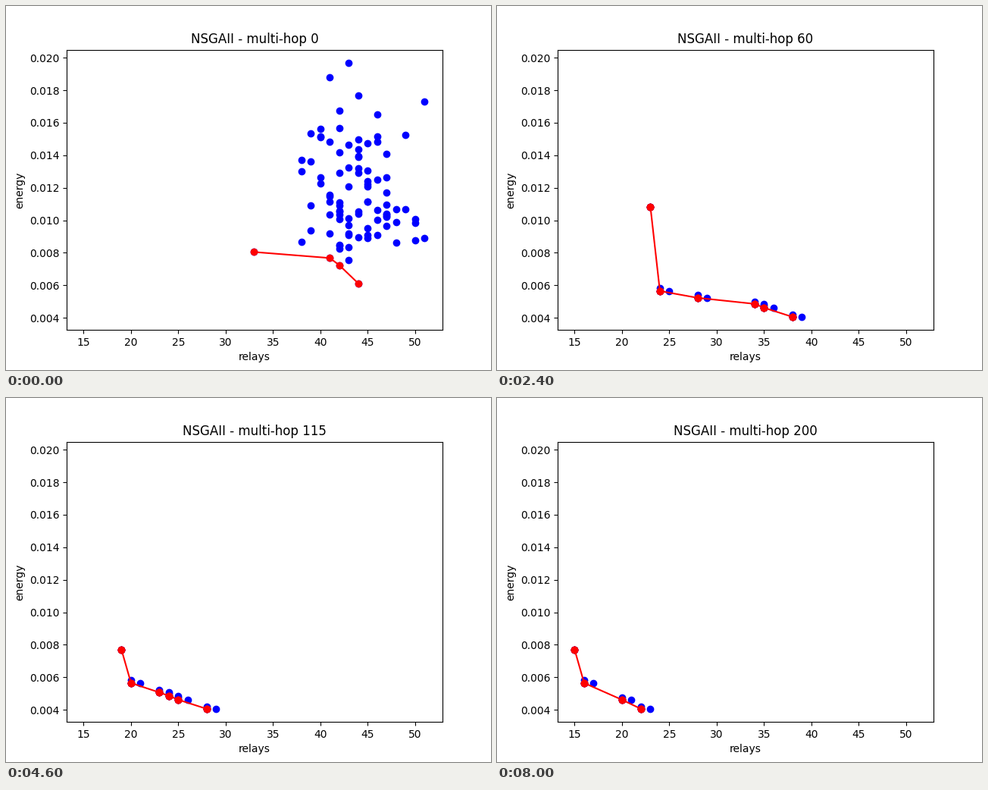
A matplotlib script for the animation above (8200 ms loop, 640 by 480 pixels).

```python
import numpy as np
import matplotlib.pyplot as plt
from matplotlib.animation import FuncAnimation

STEP, LAST = 5, 200    # generations per picture, final generation
UNIT = 1e-5            # energies below are given in this unit
SETTLE = 20            # generations until the first cloud reaches the front
CLOUD_SIZE = 88

# How few relays each energy level needs: level -> generations, relays
TRACKS = {
    1622: ([5, 20], [31, 28]),
    1083: ([25, 40, 60], [28, 25, 23]),
    805: ([0, 20], [33, 29]),
    768: ([0, 20], [41, 33]),
    724: ([0, 20], [42, 33]),
    682: ([5, 20], [38, 30]),
    668: ([10, 20], [38, 32]),
    612: ([0, 20], [44, 34]),
    602: ([10, 20, 40], [40, 33, 26]),
    565: ([60, 75, 115, 150, 200], [24, 22, 20, 17, 16]),
    523: ([5, 20, 40, 75], [40, 34, 31, 26]),
    507: ([20, 40, 115], [43, 39, 23]),
    486: ([30, 40, 115, 150], [40, 38, 24, 21]),
    462: ([35, 40, 75, 115, 150, 200], [41, 40, 32, 25, 22, 20]),
    406: ([60, 75, 115, 150, 200], [38, 33, 28, 24, 22]),
    769: ([90, 115, 150, 200], [20, 19, 17, 15]),
}

rng = np.random.default_rng(4)
relays0 = np.clip(np.round(rng.normal(44, 3, CLOUD_SIZE)), 38, 51)
energy0 = np.where(relays0 < 42, 810, 750) + rng.gamma(2, 190, CLOUD_SIZE)
energy0 = np.minimum(energy0, 1969)


def stragglers(gen):
    """The random start, sinking to a sloped band and then dying out."""
    k = min(gen / SETTLE, 1) ** 0.6
    home = 31 + (relays0 - 38) * 8 / 13
    relays = np.round(relays0 + (home - relays0) * k)
    energy = energy0 + (690 - 17 * (relays - 31) - energy0) * k
    alive = int(CLOUD_SIZE * np.clip(2 - gen / SETTLE, 0, 1) ** 3)
    return list(zip(relays, energy))[:alive]


def pareto(pop):
    def dominated(p):
        return any(q != p and q[0] <= p[0] and q[1] <= p[1] for q in pop)
    return sorted(p for p in pop if not dominated(p))


def evolve(gen):
    best = pareto([(round(np.interp(gen, gens, relays)), level)
                   for level, (gens, relays) in TRACKS.items()
                   if gen >= gens[0]])
    pop = best + stragglers(gen)
    if gen:
        # near copies: one relay more, or slightly more energy
        for relays, energy in best[1:]:
            pop += [(relays + 1, energy), (relays, energy * 1.03)]
        pop += best * 2
    return pop, pareto(pop)


def place(line, pts):
    line.set_data([r for r, _ in pts], [e * UNIT for _, e in pts])


fig, ax = plt.subplots(figsize=(6.4, 4.8), dpi=100)
ax.set_xlim(13.2, 52.9)
ax.set_ylim(325.5 * UNIT, 2049.5 * UNIT)
ax.set_xlabel("relays")
ax.set_ylabel("energy")
title = ax.set_title("")
cloud, = ax.plot([], [], "o", color="blue")
front, = ax.plot([], [], "o-", color="red")


def draw(i):
    gen = i * STEP
    pop, best = evolve(gen)
    place(cloud, pop)
    place(front, best)
    title.set_text(f"NSGAII - multi-hop {gen}")
    return cloud, front, title


anim = FuncAnimation(fig, draw, frames=LAST // STEP + 1, interval=200,
                     repeat=True, repeat_delay=0)
plt.show()
```
